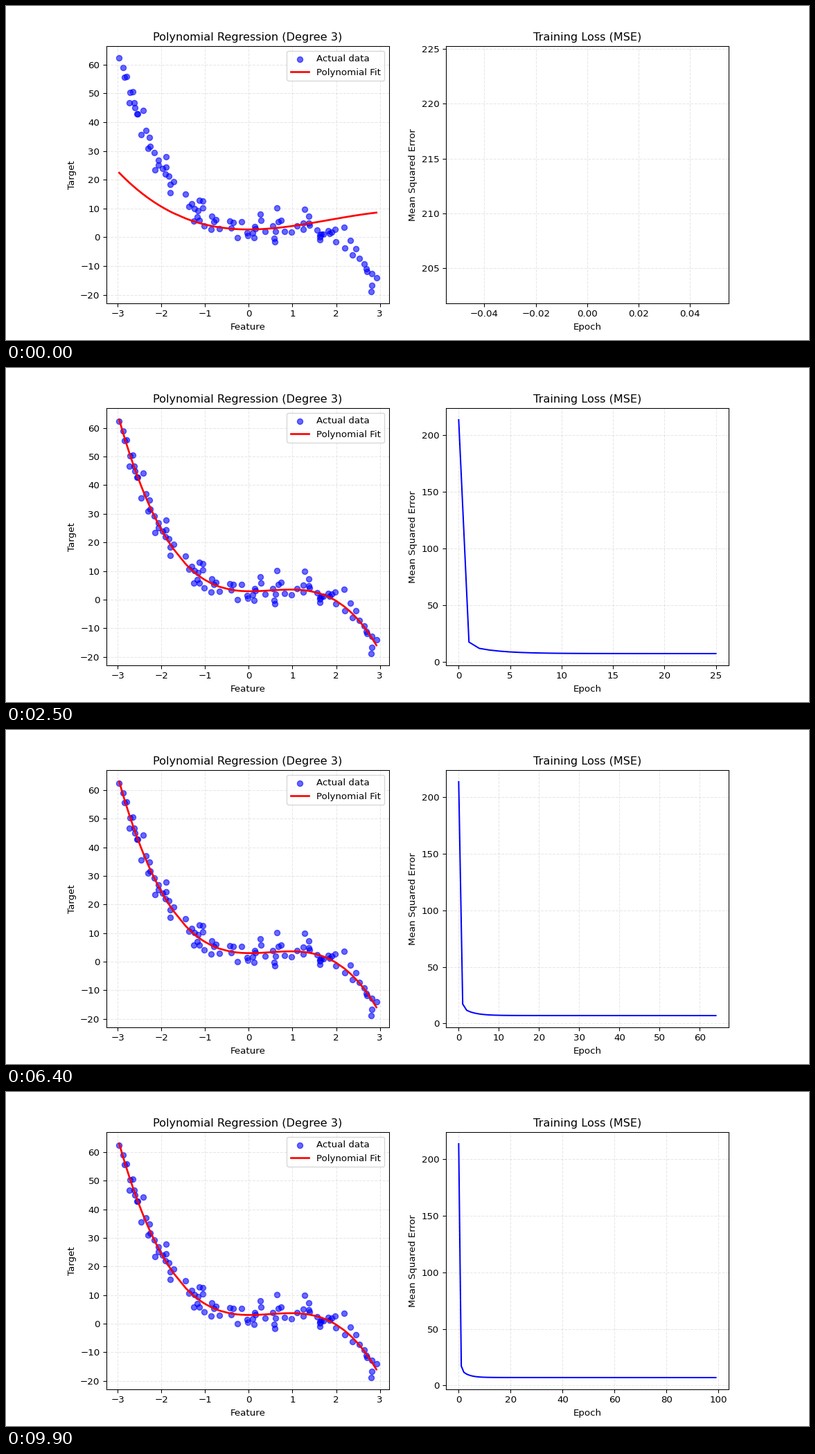
Write a matplotlib script that moves like this. It is 1159 px wide and 483 px high and loops after 10000 ms.

```python
import numpy as np
import matplotlib.pyplot as plt
from matplotlib.animation import FuncAnimation

W, H = 1159, 483
DPI = H / 5
EPOCHS = 100
RATE = 0.01

# Noisy cubic data and random starting weights
np.random.seed(42)
x = 6 * np.random.rand(100) - 3
y = 4 + 2 * x**2 - 1.5 * x**3 + 3 * np.random.randn(100)
weights = np.random.randn(3)
bias = np.random.randn()

features = np.column_stack([x, x**2, x**3])
order = np.argsort(x)


def train(weights, bias):
    """Full-batch gradient descent; prediction and loss before each step."""
    fits, losses = [], []
    for _ in range(EPOCHS):
        fit = features @ weights + bias
        error = fit - y
        fits.append(fit[order])
        losses.append(np.mean(error**2))
        weights = weights - RATE * features.T @ error / len(y)
        bias = bias - RATE * error.mean()
    return fits, losses


def style(ax, title, xlabel, ylabel):
    ax.set_title(title)
    ax.set_xlabel(xlabel)
    ax.set_ylabel(ylabel)
    ax.grid(True, linestyle="--", alpha=0.3)


fits, losses = train(weights, bias)

plt.rcParams["font.family"] = "DejaVu Sans"
# The tiny surplus keeps the pixel size from being rounded down
fig, (ax_fit, ax_loss) = plt.subplots(
    1, 2, figsize=((W + 1e-6) / DPI, (H + 1e-6) / DPI), dpi=DPI)

ax_fit.scatter(x, y, color="blue", alpha=0.6, label="Actual data")
fit_line, = ax_fit.plot(x[order], fits[0], color="red", lw=2,
                        label="Polynomial Fit")
loss_line, = ax_loss.plot([0], losses[:1], color="blue")
style(ax_fit, "Polynomial Regression (Degree 3)", "Feature", "Target")
style(ax_loss, "Training Loss (MSE)", "Epoch", "Mean Squared Error")
ax_fit.legend(loc="upper right")

points = np.column_stack([x, y])


def update(epoch):
    fit_line.set_ydata(fits[epoch])
    loss_line.set_data(np.arange(epoch + 1), losses[:epoch + 1])
    for ax in (ax_fit, ax_loss):
        ax.relim()
    ax_fit.update_datalim(points)
    for ax in (ax_fit, ax_loss):
        ax.autoscale_view()
    return fit_line, loss_line


anim = FuncAnimation(fig, update, frames=EPOCHS, interval=100,
                     init_func=lambda: update(0), repeat=True,
                     repeat_delay=0, blit=False)
plt.show()
```
